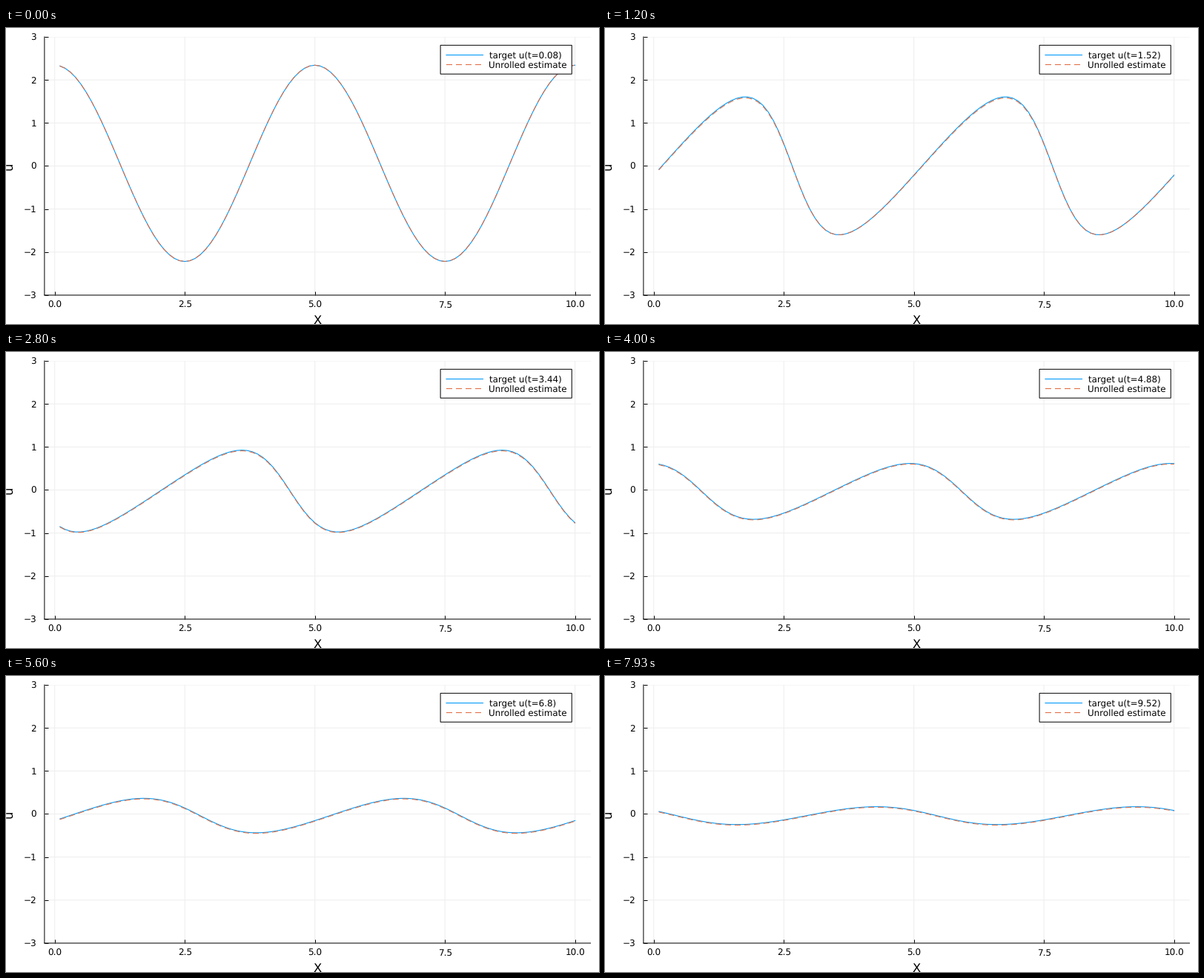
Recreate the animation shown at these times as a matplotlib script. Size 800x400 px, loop 8000 ms.

```python
import numpy as np
import matplotlib.pyplot as plt
from matplotlib.animation import FuncAnimation
from matplotlib.lines import Line2D
from matplotlib.patches import Rectangle

W, H, DPI = 800, 400, 100
FRAMES, LOOP = 120, 8000
DT = 0.08
PX = 72 / DPI  # one pixel in points
BLUE, ORANGE, GRID = "#009afa", "#e26f46", "#eeeeee"
DASH = (0, (8 * PX, 5 * PX))

plt.rcParams.update({
    "font.family": "DejaVu Sans",
    "text.hinting": "none",
    "lines.scale_dashes": False,
    "path.snap": False,
    "toolbar": "None",
})

# Damped, steepening wave: viscous Burgers flow through the Cole-Hopf series
K = 2 * np.pi / 5
AMP, SCALE, DECAY, SPEED = 2.28, 1.754, 0.2355, 0.9735
x = np.arange(1, 101) / 10
order = np.arange(1, 10)[:, None]
s = np.linspace(0, 2 * np.pi, 256, endpoint=False)
weight = np.exp(AMP / SCALE * np.cos(s))
coef = 2 * (weight * np.cos(order * s)).mean(axis=1, keepdims=True) / weight.mean()


def wave(tau):
    """Return the true profile and the estimate after time tau."""
    bump = tau * np.exp(-tau)
    theta = K * (x - SPEED * tau - 0.025 * bump) + np.pi / 2
    a = coef * np.exp(-DECAY * order**2 * tau)
    num = (order * a * np.sin(order * theta)).sum(axis=0)
    den = 1 + (a * np.cos(order * theta)).sum(axis=0)
    v = SCALE * num / den
    mean = -0.038 + 0.1 * np.exp(-0.6 * tau)
    drift = 0.0125 * (1 - np.exp(-3 * tau))
    return mean + v, mean - drift + v * (1 - 0.02 * bump)


fig = plt.figure(figsize=(W / DPI, H / DPI), dpi=DPI, facecolor="white")
left, right, top, bottom = 51.9, 788.5, 12, 361
ax = fig.add_axes([left / W, 1 - bottom / H, (right - left) / W, (bottom - top) / H])
ax.set_xlim(-0.197, 10.297)
ax.set_ylim(-3, 3)
ax.set_axisbelow(True)
ax.patch.set_visible(False)

xticks = [0, 2.5, 5, 7.5, 10]
yticks = range(-3, 4)
ax.set_xticks(xticks, labels=[])
ax.set_yticks(yticks, labels=[])
ax.tick_params(direction="in", length=5 * PX, width=PX)
ax.grid(color=GRID, linewidth=PX)
for side, spine in ax.spines.items():
    spine.set_visible(side in ("left", "bottom"))
    spine.set_linewidth(PX)


def put(px, py, text, size=12, **kw):
    kw = {"ha": "center", "va": "baseline", **kw}
    return fig.text(px / W, 1 - py / H, text, fontsize=size * PX, **kw)


for v in xticks:
    put(left + (v + 0.197) / 10.494 * (right - left), 378.3, f"{v:.1f}")
for v in yticks:
    label = str(v).replace("-", "\u2212")
    put(41, top + (3 - v) / 6 * (bottom - top) + 4.4, label, ha="right")
put(420.2, 399.8, "X", 16.4)
put(9, 186.5, "u", 16.4, rotation=90, rotation_mode="anchor")

true_line, = ax.plot([], [], color=BLUE, lw=1.1 * PX)
est_line, = ax.plot([], [], color=ORANGE, lw=1.1 * PX, ls=DASH, dash_capstyle="butt")

# Legend
fig.add_artist(Rectangle((586.1 / W, 1 - 62.2 / H), 177.2 / W, 38.9 / H,
                         fc="white", ec="black", lw=PX, zorder=5))
for py, color, style in ((36.5, BLUE, "-"), (49.5, ORANGE, DASH)):
    fig.add_artist(Line2D([594 / W, 643.5 / W], [1 - py / H] * 2, color=color,
                          ls=style, lw=1.1 * PX, dash_capstyle="butt", zorder=6))
time_text = put(652, 40.8, "", 11.9, ha="left", zorder=6)
put(651, 53.8, "Unrolled estimate", 11.9, ha="left", zorder=6)


def draw(i):
    true, est = wave(i * DT)
    true_line.set_data(x, true)
    est_line.set_data(x, est)
    time_text.set_text(f"target u(t={round((i + 1) * DT, 2)})")
    return true_line, est_line, time_text


anim = FuncAnimation(fig, draw, frames=FRAMES, init_func=lambda: draw(0),
                     interval=LOOP / FRAMES, repeat=True, repeat_delay=0)
plt.show()
```
